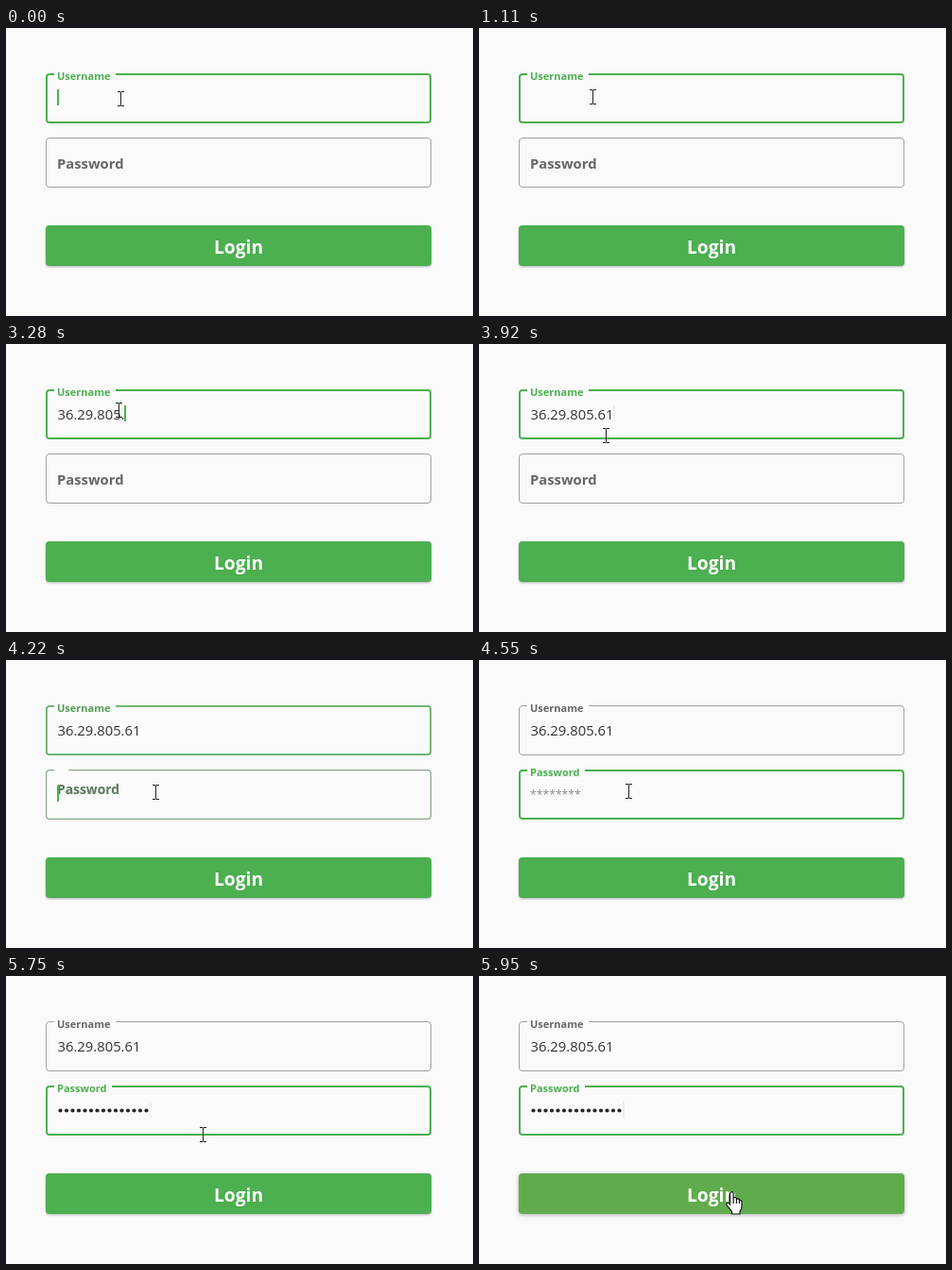
These frames come from a looping animation (494 px wide and 305 px high, 5970 ms). An HTML page:

```html
<!DOCTYPE html>
<html lang="en">
<head>
<meta charset="utf-8">
<title>Login form</title>
<style>
html, body { margin: 0; width: 100%; height: 100%; overflow: hidden; background: #fafafa; }
svg { display: block; font-family: "Open Sans", "Noto Sans", sans-serif; }
.frame { fill: none; }
.label { font-size: 14.8px; font-weight: 700; }
.value { font-size: 14.8px; fill: #333; }
#hint { font-size: 12.2px; fill: #666; }
#caret { fill: #4caf50; }
#login { font-size: 19.2px; font-weight: 700; fill: #fff; text-anchor: middle; }
</style>
</head>
<body>
<svg width="494" height="305" viewBox="0 0 494 305">
  <path class="frame" id="userFrame"/>
  <text class="label" id="userLabel">Username</text>
  <text class="value" id="user" x="54.5" y="80"></text>

  <path class="frame" id="passFrame"/>
  <text class="label" id="passLabel">Password</text>
  <text id="hint" x="54" y="147">********</text>
  <g id="dots" fill="#262626"></g>
  <rect id="caret" width="2" height="17"/>

  <rect id="button" x="42" y="209" width="408" height="43" rx="4"/>
  <text id="login" x="246" y="239">Login</text>

  <g id="cursor">
    <path id="beam" fill="none" stroke="#222" d="M-3.5-7.5h3l.5.5.5-.5h3M-3.5 7.5h3l.5-.5.5.5h3M0-7V7"/>
    <path id="arrow" fill="#fff" stroke="#111" d="M0 0V16L3.7 12.5L6.2 18L8.6 17L6.2 11.6H11.3Z"/>
    <path id="hand" fill="#fff" stroke="#111" stroke-width="1.2" d="M-2 13V1.5a1.8 1.8 0 0 1 3.6 0V8V7a1.6 1.6 0 0 1 3.3 0V8a1.6 1.6 0 0 1 3 0V9a1.5 1.5 0 0 1 2.6 1v5q0 3-2 5v3H0V20.5L-5.5 13.5a1.6 1.6 0 0 1 2.4-2ZM1.6 8v4M4.9 8v4M7.9 9v3"/>
  </g>
</svg>
<script>
const LOOP = 5970, CLICK = 4209;
const NAME = "36.29.805.61";
const nameTimes = [1840, 2040, 2200, 2340, 2500, 2660, 2800, 2920, 2990, 3180, 3400, 3600];
const passTimes = Array.from({ length: 15 }, (_, i) => 4636 + 56 * i);
const GREEN = [76, 175, 80], LINE = [160, 160, 160], LABEL = [102, 102, 102];
// time, x, y of the pointer's hot spot
const route = [[0, 121, 75], [860, 121, 75], [1450, 119, 70], [3780, 119, 70],
  [4140, 158, 140], [4360, 158, 139], [5630, 158, 139], [5750, 208, 168], [5950, 267, 229], [LOOP, 267, 229]];

const $ = id => document.getElementById(id);
const clamp = v => Math.max(0, Math.min(1, v));
const mix = (a, b, p) => a + (b - a) * p;
const tint = (a, b, p) => `rgb(${a.map((v, i) => Math.round(mix(v, b[i], p)))})`;
const set = (id, attrs) => {
  for (const k in attrs) $(id).setAttribute(k, attrs[k]);
};

for (let i = 0; i < passTimes.length; i++) {
  const dot = document.createElementNS("http://www.w3.org/2000/svg", "circle");
  dot.setAttribute("cx", 57.5 + 6.5 * i);
  dot.setAttribute("cy", 142.5);
  dot.setAttribute("r", 2.1);
  $("dots").append(dot);
}

// cubic-bezier(0, 0, .2, 1)
function easeOut(x) {
  let lo = 0, hi = 1;
  for (let i = 0; i < 20; i++) {
    const s = (lo + hi) / 2;
    if (.6 * s * s * (1 - s) + s ** 3 < x) lo = s; else hi = s;
  }
  return lo * lo * (3 - 2 * lo);
}

function field(id, top, gap, focus, lift) {
  const w = 1 + focus, h = w / 2, r = 4 - h;
  const left = 42 + h, right = 450 - h, y = top + h, bottom = top + 53 - h;
  const arc = (x, y) => `A${r} ${r} 0 0 1 ${x} ${y}`;
  set(id + "Frame", {
    d: `M${51 + gap * lift} ${y}H${right - r}${arc(right, y + r)}V${bottom - r}${arc(right - r, bottom)}` +
       `H${left + r}${arc(left, bottom - r)}V${y + r}${arc(left + r, y)}H51`,
    stroke: tint(LINE, GREEN, focus), "stroke-width": w
  });
  set(id + "Label", {
    transform: `translate(54 ${top + mix(32.8, 7.2, lift)}) scale(${mix(1, .746, lift)})`,
    fill: tint(LABEL, GREEN, focus)
  });
}

function caretAlpha(age) {
  const a = age % 690;
  if (a < 170) return 1;
  if (a < 340) return 1 - (a - 170) / 170;
  return a < 510 ? 0 : (a - 510) / 180;
}

function pointer(t) {
  const i = route.findIndex(p => p[0] > t);
  const [t0, x0, y0] = route[i - 1], [t1, x1, y1] = route[i];
  const p = (t - t0) / (t1 - t0);
  return [mix(x0, x1, p), mix(y0, y1, p)];
}

function draw(t) {
  const focus = easeOut(clamp((t - CLICK) / 140));
  field("user", 48, 65, 1 - focus, 1);
  field("pass", 116, 61, focus, focus);

  const typed = nameTimes.filter(k => k <= t).length;
  const hidden = passTimes.filter(k => k <= t).length;
  $("user").textContent = NAME.slice(0, typed);
  [...$("dots").children].forEach((dot, i) => dot.setAttribute("opacity", i < hidden ? 1 : 0));
  set("hint", { opacity: hidden ? 0 : .75 * focus });

  const inPass = t >= CLICK;
  const lastKey = Math.max(0, ...[...nameTimes, CLICK, ...passTimes].filter(k => k <= t));
  const width = inPass ? 6.5 * hidden : typed && $("user").getComputedTextLength();
  set("caret", {
    x: Math.round(54 + width), y: inPass ? 133 : 65, opacity: caretAlpha(t - lastKey)
  });

  const [x, y] = pointer(t);
  const overButton = y >= 209;
  const overField = (y >= 48 && y <= 101) || (y >= 116 && y <= 169);
  set("cursor", { transform: `translate(${Math.round(x) + .5} ${Math.round(y)})` });
  set("beam", { opacity: +overField });
  set("arrow", { opacity: +(!overField && !overButton) });
  set("hand", { opacity: +overButton });

  const hover = clamp((t - 5885) / 75);
  set("button", { fill: tint(GREEN, [99, 172, 76], hover) });
  $("button").style.filter =
    `drop-shadow(0 ${mix(1, 2, hover)}px ${mix(1.2, 2.2, hover)}px rgba(0,0,0,.3))`;
}

let start;
function tick(now) {
  start ??= now;
  draw((now - start) % LOOP);
  requestAnimationFrame(tick);
}
draw(0);
requestAnimationFrame(tick);
</script>
</body>
</html>
```
